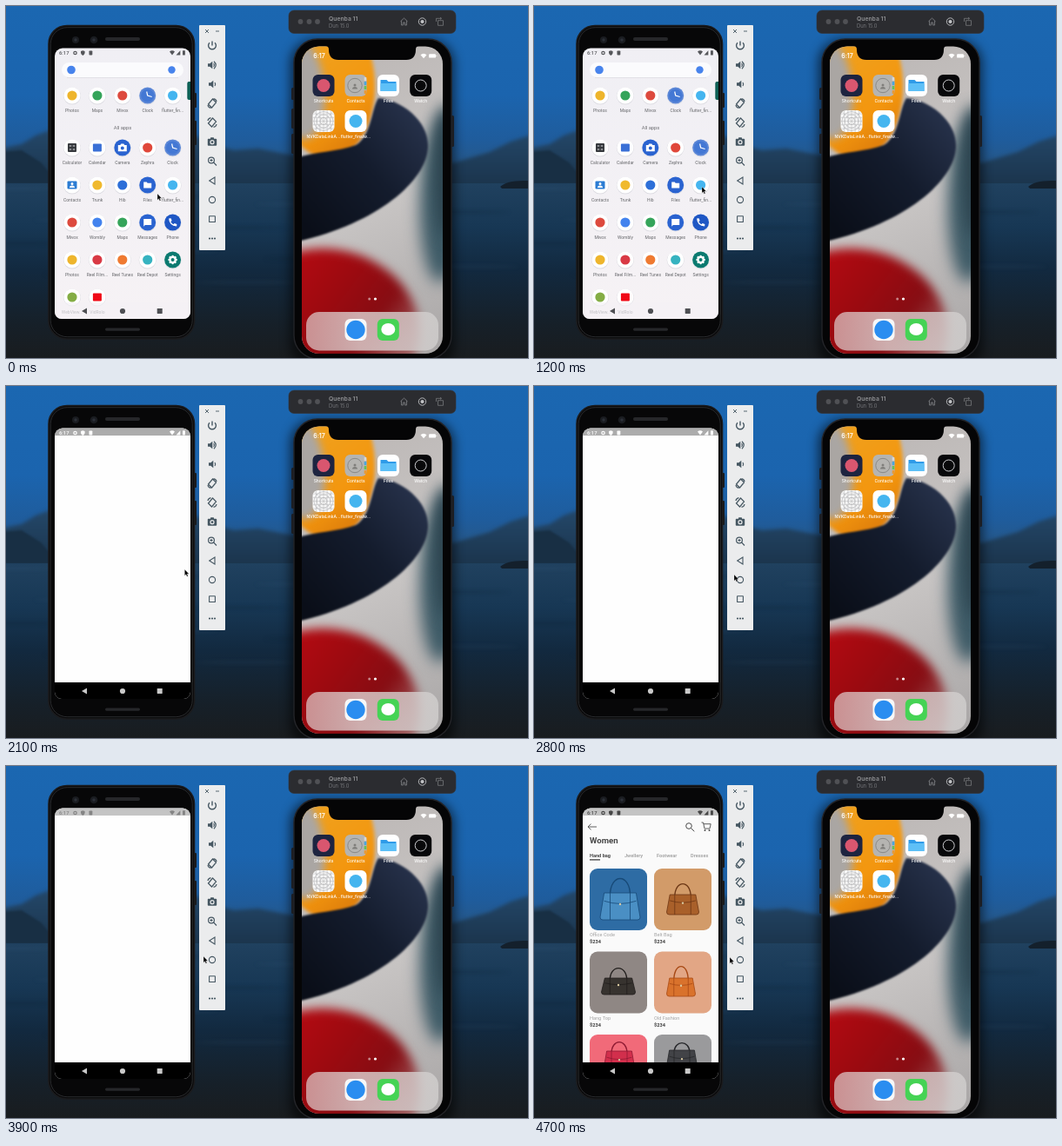
An HTML page with a canvas for the animation above (5 s loop, 600 px wide and 405 px high).

```html
<!DOCTYPE html>
<html lang="en">
<head>
<meta charset="utf-8">
<title>Two phone simulators</title>
<style>
html, body { margin: 0; width: 100%; height: 100%; overflow: hidden; background: #191c1f; }
canvas { display: block; }
</style>
</head>
<body>
<canvas id="stage" width="600" height="405"></canvas>
<script>
const c = document.getElementById('stage').getContext('2d');
const LOOP = 5000, STEP = 100;
const INK = '#465762', BLUE = '#2a63d0';

// ---- drawing helpers ----
function box(x, y, w, h, r, fill, stroke, lw = 1) {
  c.beginPath();
  c.roundRect(x, y, w, h, r);
  if (fill) { c.fillStyle = fill; c.fill(); }
  if (stroke) { c.strokeStyle = stroke; c.lineWidth = lw; c.stroke(); }
}
function disc(x, y, r, fill, stroke, lw = 1) {
  box(x - r, y - r, 2 * r, 2 * r, r, fill, stroke, lw);
}
function oval(x, y, rx, ry, turn, fill) {
  c.beginPath();
  c.ellipse(x, y, rx, ry, turn, 0, 7);
  c.fillStyle = fill;
  c.fill();
}
function shape(d, x, y, fill, stroke, lw = 1) {
  c.save();
  c.translate(x, y);
  const p = new Path2D(d);
  if (fill) { c.fillStyle = fill; c.fill(p); }
  if (stroke) { c.strokeStyle = stroke; c.lineWidth = lw; c.stroke(p); }
  c.restore();
}
function text(s, x, y, size, fill, weight = 400, align = 'left', family = 'Roboto') {
  c.font = `${weight} ${size}px ${family}, sans-serif`;
  c.textAlign = align;
  c.textBaseline = 'middle';
  c.fillStyle = fill;
  c.fillText(s, x, y);
}
function ramp(x0, y0, x1, y1, ...stops) {
  const g = c.createLinearGradient(x0, y0, x1, y1);
  stops.forEach(([at, color]) => g.addColorStop(at, color));
  return g;
}
function clipped(x, y, w, h, r, draw) {
  c.save();
  c.beginPath();
  c.roundRect(x, y, w, h, r);
  c.clip();
  draw();
  c.restore();
}
function blurred(px, draw) {
  c.save();
  c.filter = `blur(${px}px)`;
  draw();
  c.restore();
}
const clamp = v => Math.max(0, Math.min(1, v));
const grey = v => `rgb(${v},${v},${v})`;

// ---- desktop ----
function desktop() {
  c.fillStyle = ramp(0, 0, 0, 206, [0, '#1b67b1'], [.5, '#1b64ae'], [.75, '#1f5c9c'], [1, '#2b5378']);
  c.fillRect(0, 0, 600, 206);
  blurred(2, () => {
    shape('M-5 164L18 159 34 149 50 143 120 130 200 140 240 160 262 166 290 164 330 172 420 190 516 180 556 168 580 156 605 148V208H-5Z',
      0, 0, ramp(0, 140, 0, 208, [0, '#24486a'], [1, '#1b344c']));
  });
  blurred(1, () => shape('M-5 168L18 166 40 180 60 204H-5Z', 0, 0, '#182f44'));
  c.fillStyle = ramp(0, 204, 0, 405, [0, '#20415f'], [.25, '#173754'], [.5, '#12293f'], [.8, '#162029'], [1, '#191c1f']);
  c.fillRect(0, 204, 600, 201);
  blurred(2, () => {
    for (let i = 0; i < 14; i++)
      oval((i * 173) % 600, 210 + i * 9, 60, 1.5, 0, i % 2 ? '#0b1c2c40' : '#4d739822');
  });
  blurred(.6, () => shape('M568 208Q576 200 600 201V210H570Z', 0, 0, '#14202c'));
}

// ---- left phone ----
function leftBody() {
  box(215, 100, 4, 17, 1, '#1a1a1c');
  box(215, 132, 4, 28, 1, '#1a1a1c');
  box(49, 22.5, 167.5, 360.5, 21, '#070708', '#1b1b1d', 1.6);
  box(51.2, 24.7, 163, 356, 19, null, '#343538', .8);
  disc(80, 39, 4, '#1a1c20');
  disc(80, 39, 1.7, '#2c3038');
  disc(101, 39, 4.3, '#1a1c20');
  disc(101, 39, 1.8, '#2c3038');
  box(114, 36, 40, 4, 2, '#26272a');
  box(114, 370.5, 40, 3.2, 1.6, '#26272a');
}

function statusBar(color) {
  text('6:17', 61, 54, 5.8, color, 500);
  disc(79.5, 54, 1.7, null, color, 1.2);
  shape('M0-2.8L2.3-2V0Q2 2 0 3Q-2 2-2.3 0V-2Z', 88.3, 54, color);
  box(95.5, 51.5, 3.8, 5, .7, color);
  shape('M-3-1.5Q0-4 3-1.5L0 2.6Z', 191, 54, color);
  shape('M2.3-2.7V2.6H-2.5Z', 198, 54, color);
  box(203, 51.3, 2.9, 5.2, .5, color);
}

const navIcons = color => {
  shape('M3-3.6V3.6L-3 0Z', 90, 351, color);
  disc(134, 351, 3.1, color);
  box(173.7, 348, 6, 6, .4, color);
};

const FOLDER = 'M-4.5-3.5H-1L0-2.3H4.5V3.6H-4.5Z';
const PERSON = 'M-3 3Q-3 .5 0 .5Q3 .5 3 3ZM-1.5-1.5A1.5 1.5 0 1 1 1.5-1.5A1.5 1.5 0 1 1-1.5-1.5Z';

// A plain dot on the launcher's white backing
const dot = color => (x, y) => disc(x, y, 5.6, color);
const block = color => (x, y) => box(x - 5, y - 4.5, 10, 9, 1, color);
// A full disc with a white pictogram
const badge = (color, d) => (x, y) => {
  disc(x, y, 9.5, color);
  shape(d, x, y, '#fff');
};
const clock = (x, y) => {
  disc(x, y, 9.5, '#5b86d6');
  disc(x, y, 7.6, '#4478d4');
  shape('M-1-4.5L0 0L5 1.5', x, y, null, '#fff', 1.2);
};
const calculator = (x, y) => {
  box(x - 5, y - 5, 10, 10, 1, '#36393d');
  for (const [dx, dy] of [[-2, -2], [2, -2], [-2, 2], [2, 2]])
    box(x + dx - 1.2, y + dy - .5, 2.4, 1, 0, '#d8dadd');
};
const contact = (x, y) => {
  box(x - 5.5, y - 4.5, 11, 9, 1, '#2b7cd3');
  shape(PERSON, x, y, '#fff');
};
const camera = badge(BLUE, 'M-5-3H-2.5L-1.5-4.5H1.5L2.5-3H5V4.2H-5ZM-2 .5A2 2 0 1 0 2 .5A2 2 0 1 0-2 .5Z');
const files = badge(BLUE, FOLDER);
const bubble = badge(BLUE, 'M-4.5-4H4.5V3H-2.8L-4.5 4.7Z');
const receiver = badge('#1f57c4', 'M-4.5-4.5L-2-4.8-1-2-2.3-.8Q-1.2 1.4.8 2.3L2 1 4.8 2 4.5 4.4Q-4 4-4.5-4.5Z');
const gear = (x, y) => {
  disc(x, y, 9.5, '#0c7a70');
  for (let i = 0; i < 8; i++)
    oval(x + 4 * Math.cos(i * Math.PI / 4), y + 4 * Math.sin(i * Math.PI / 4), 1.3, 1.3, 0, '#fff');
  disc(x, y, 3.1, null, '#fff', 2.2);
};

const flutterApp = ['flutter_fin...', dot('#45b5ef')];
const photos = ['Photos', dot('#eeb52c')];
const maps = ['Maps', dot('#35a45a')];
const mail = ['Mivox', dot('#dd4a3e')];
const ROWS = [
  [103, photos, maps, mail, ['Clock', clock], flutterApp],
  [163, ['Calculator', calculator], ['Calendar', block('#3a70d6')], ['Camera', camera], ['Zephra', dot('#e0473a')], ['Clock', clock]],
  [206, ['Contacts', contact], ['Trunk', dot('#f0b92d')], ['Hib', dot('#2d6fd8')], ['Files', files], flutterApp],
  [249, mail, ['Wombly', dot('#4383ee')], maps, ['Messages', bubble], ['Phone', receiver]],
  [292, photos, ['Reel Film...', dot('#d93a45')], ['Reel Tunes', dot('#ef7a31')], ['Reel Depot', dot('#36b3c0')], ['Settings', gear]],
  [335, ['WebView...', dot('#84ad45')], ['VidRolo', block('#f00a17')]],
];

function launcher() {
  c.fillStyle = ramp(0, 48, 0, 360, [0, '#f0eff4'], [1, '#f6f2f5']);
  c.fillRect(56, 48, 156, 312);
  statusBar('#55565a');
  box(64, 65, 140, 17, 8.5, '#fbfbfd');
  c.fillStyle = '#d9d8de';
  c.fillRect(70, 82, 128, .6);
  disc(75, 73.5, 4.8, '#4783ec');
  disc(190.5, 73.5, 4.2, '#4783ec');
  text('All apps', 134, 140.5, 5.8, '#6b6c70', 400, 'center');
  for (const [y, ...apps] of ROWS)
    apps.forEach(([label, icon], i) => {
      const x = 76 + i * 28.9;
      disc(x, y + .6, 10, '#dddce2');
      disc(x, y, 9.6, '#fff');
      icon(x, y);
      text(label, x, y + 18, 5, '#66676b', 400, 'center');
    });
  c.fillStyle = '#f4f2f6a8';
  c.fillRect(56, 341, 156, 19);
  navIcons('#4e4f53');
  box(208.3, 87, 6, 21, 2, '#0d5f55');
}

// ---- shop page ----
function bag(x, y, w, h, rise, fill, edge) {
  const a = w / 2, b = a * .8, q = w / 4;
  shape(`M${-q} 3C${-q} ${-rise * 1.35} ${q} ${-rise * 1.35} ${q} 3`, x, y, null, edge, 1.4);
  shape(`M${-b} 0H${b}L${a} ${h - 3}Q${a} ${h} ${a - 3} ${h}H${3 - a}Q${-a} ${h} ${-a} ${h - 3}Z`, x, y, fill, edge, .8);
  shape(`M${-b} ${h * .3}Q0 ${h * .5} ${b} ${h * .3}M${-q} 0V${h}M${q} 0V${h}`, x, y, null, edge, .8);
  disc(x, y + h * .42, 1.2, '#d9c9a0');
}
const GOODS = [
  ['Office Code', '#2e6ca4', [99, 146, 46, 31, 17, '#4a8fc4', '#174a78']],
  ['Belt Bag', '#d29b69', [171, 148, 37, 23, 13, '#a9602a', '#6c3715']],
  ['Hang Top', '#8f8784', [97, 244, 39, 19, 12, '#37332f', '#211e1c']],
  ['Old Fashion', '#e2a685', [169, 244, 33, 21, 14, '#d9722c', '#a84915']],
  ['', '#f16a79', [98, 328, 36, 24, 11, '#d22f4c', '#8f1b33']],
  ['', '#9a9a9c', [170, 327, 36, 24, 9, '#424347', '#26272a']],
];
function shop(t) {
  c.save();
  c.globalAlpha = clamp((t - 4000) / 300);
  c.fillStyle = '#fafafa';
  c.fillRect(56, 57, 156, 284);
  shape('M5 0H-5M-1.5-3.3L-5 0L-1.5 3.3', 67, 70, null, '#4a4a4a', .9);
  disc(178, 69, 3.3, null, '#4a4a4a', 1);
  shape('M0 0L4 4', 180.3, 71.3, null, '#4a4a4a', 1);
  shape('M-5.5-4.5H-3.5L-2 2.5H4L5.2-2.8H-3', 198, 69.5, null, '#4a4a4a', .9);
  disc(196.5, 74, 1, '#4a4a4a');
  disc(201.5, 74, 1, '#4a4a4a');
  text('Women', 64, 86.5, 9.6, '#454545', 700);
  [['Hand bag', 64], ['Jwellery', 104], ['Footwear', 141], ['Dresses', 180]].forEach(([s, x], i) =>
    text(s, x, 103, 5.6, i ? '#a6a6a6' : '#454545', 700));
  c.fillStyle = '#333';
  c.fillRect(64, 107.3, 12, 1.2);
  clipped(56, 110, 156, 231, 0, () => GOODS.forEach(([name, color, parts], i) => {
    const x = 64 + i % 2 * 74, y = 118 + (i >> 1) * 95.5;
    const base = c.globalAlpha;
    c.globalAlpha = base * clamp((t - 4300) / 300);
    box(x, y, 66, 71, 9, color);
    bag(...parts);
    c.globalAlpha = base;
    if (name) {
      text(name, x, y + 76.5, 5.6, '#a3a3a3');
      text('$234', x, y + 84.5, 5.6, '#3c3c3c', 700);
    }
  }));
  c.restore();
}

function appWindow(t) {
  const top = t < 1600 ? 130 : t < 1700 ? 53 : 48;
  clipped(56, top, 156, 360 - top, 0, () => {
    c.fillStyle = '#fefefe';
    c.fillRect(56, 48, 156, 312);
    const barEnd = t < 1700 ? 60.5 : 57;
    const tone = t < 1700 ? 0 : t < 1800 ? 90 : 172 + 24 * clamp((t - 3700) / 200);
    c.fillStyle = grey(tone);
    c.fillRect(56, 48, 156, barEnd - 48);
    statusBar(grey(255 - 185 * clamp((t - 3700) / 300)));
    if (t > 4000) shop(t);
    c.fillStyle = '#000';
    c.fillRect(56, 341, 156, 19);
    navIcons('#c9c9c9');
  });
}

function toolbar() {
  box(222, 22, 30, 259, 1, '#ebeced');
  const x = 237, draw = (d, y, lw = 1.2) => shape(d, x, y, null, INK, lw);
  shape('M-2-2L2 2M2-2L-2 2', 231, 29, null, INK, .9);
  shape('M-2 0H2', 243, 29, null, INK, .9);
  draw('M0-5V0M-3-3.3A4.4 4.4 0 1 0 3-3.3', 45.5, 1.4);
  const speaker = 'M-5-1.7H-2.7L.3-4.3V4.3L-2.7 1.7H-5Z';
  shape(speaker, x, 68, INK);
  draw('M1.7-2Q3.2 0 1.7 2M2-4.2Q6.5 0 2 4.2', 68);
  shape(speaker, x + 1, 90, INK);
  draw('M3-2Q4.5 0 3 2', 90);
  draw('M-4.5 1L.5-5L4.5-1L-.5 5ZM-5 2Q-4.5 5-1.5 5.4M5-2Q4.5-5 1.5-5.4', 112);
  draw('M-4.5 1L.5-5L4.5-1L-.5 5ZM5 2Q4.5 5 1.5 5.4M-5-2Q-4.5-5-1.5-5.4', 134);
  box(x - 5.2, 152.7, 10.4, 8, 1, INK);
  box(x - 2, 151.3, 4, 3, .6, INK);
  disc(x, 156.7, 2, null, '#ebeced', 1.2);
  disc(x - 1, 177.5, 3.4, null, INK, 1.2);
  draw('M1.5 1L5 4.7M-2.6-1.3H.6M-1-2.9V.3', 178.8);
  draw('M3-4V4L-3.3 0Z', 201, 1.1);
  disc(x, 223, 3.6, null, INK, 1.1);
  box(x - 3.4, 241.7, 6.8, 6.8, .3, null, INK, 1.1);
  for (const dx of [-3, 0, 3]) disc(x + dx, 267.5, 1.1, INK);
}

// ---- right phone ----
function titleBar() {
  box(325, 5, 192, 26.5, 6, '#2b2c30', '#34353a', .6);
  for (const x of [338.5, 348.5, 358]) disc(x, 18, 2.9, '#505155');
  text('Quenba 11', 371, 15, 6.8, '#8f9093', 600, 'left', 'Inter');
  text('Dun 15.0', 371, 23, 5.8, '#737478', 400, 'left', 'Inter');
  shape('M-4-.3L0-4L4-.3M-3-.8V4H-1V1H1V4H3V-.8', 457.5, 18, null, '#85868a', .8);
  disc(478.5, 18, 4.2, null, '#c2c3c6', .9);
  disc(478.5, 18, 2.1, '#c2c3c6');
  shape('M-2.5-1.3H3.5V4.3H-2.5ZM-4.5 0V-3.7H1.5M0-5L1.5-3.7L0-2.4', 499, 18, null, '#77787c', .8);
}

function wallpaper() {
  c.fillStyle = ramp(340, 46, 502, 398, [0, '#bab5b3'], [.5, '#c9c6c5'], [1, '#a9a6a6']);
  c.fillRect(340, 46, 162, 355);
  blurred(9, () => {
    oval(503, 218, 27, 100, .04, '#3d5a66');
    oval(508, 190, 14, 75, 0, '#2b414c');
  });
  // Orange crescent around a grey core
  blurred(2, () => {
    oval(368, 88, 56, 88, -.06, ramp(340, 50, 425, 165, [0, '#f0a21f'], [.6, '#f3960e'], [1, '#d5730a']));
  });
  blurred(5, () => oval(335, 92, 31, 62, -.15, '#aaa6a3'));
  blurred(1.2, () => {
    shape('M330 176C350 168 380 168 402 160C420 150 420 118 428 106C455 108 487 133 485 163C483 202 425 252 330 272Z',
      0, 0, ramp(340, 250, 480, 130, [0, '#0a0e18'], [.55, '#141c2d'], [1, '#27324b']));
  });
  blurred(6, () => {
    oval(372, 366, 104, 86, .22, ramp(345, 285, 470, 380, [0, '#b00a11'], [.35, '#9c0a10'], [.7, '#860d13'], [1, '#9d5a5c']));
  });
}

function tile(x, y, fill, label) {
  box(x - 12.5, y - 12.5, 25, 25, 6, fill);
  if (label) text(label, x, y + 17.6, 4.9, '#fff', 500, 'center', 'Inter');
}
function rightApps() {
  tile(365, 91.5, '#1d2440', 'Shortcuts');
  disc(365, 91.5, 7.5, '#d9566f');
  tile(402, 91.5, '#b5b4b1', 'Contacts');
  disc(401, 91.5, 8.2, null, '#7f7e7b', .8);
  shape(PERSON, 401, 92.5, '#7f7e7b');
  ['#d8d8d6', '#4ba6dc', '#67c15a', '#e89a35'].forEach((color, i) => box(411.7, 82 + i * 5, 2.6, 4, .5, color));
  tile(439.5, 91.5, '#fff', 'Files');
  shape('M-9-6.5H-2L0-4.5H9V6.5H-9Z', 439.5, 91.5, '#2f9be8');
  box(430.5, 89, 18, 9, 1, '#5ec0f7');
  tile(476.7, 91.5, '#08080a', 'Watch');
  disc(476.7, 91.5, 6.5, null, '#c9c9cc', 1);

  tile(365, 132.5, '#fafafa', 'NVKDataLinkA...');
  clipped(352.5, 120, 25, 25, 6, () => {
    for (let i = 1; i < 6; i++) {
      const d = i * 25 / 6;
      shape(`M${d} 0V25M0 ${d}H25`, 352.5, 120, null, '#b4b4b6', .5);
    }
    shape('M0 0L25 25M25 0L0 25', 352.5, 120, null, '#b4b4b6', .5);
    for (const r of [4, 7.5, 11]) disc(365, 132.5, r, null, '#a9a9ac', .6);
  });
  tile(402, 132.5, '#fff', 'flutter_finalw...');
  disc(402, 132.5, 7.5, '#45b5ef');

  disc(417.7, 337, 1.5, '#ffffff80');
  disc(424.5, 337, 1.6, '#fff');
  box(345, 352, 152, 44.5, 15, ramp(345, 0, 497, 0, [0, '#dcc4c4b8'], [.4, '#ddd0cfd0'], [1, '#d2d0cfc8']));
  tile(402, 372.5, '#f6f7f8');
  disc(402, 372.5, 10.7, '#2a8df0');
  tile(439.3, 372.5, '#45d354');
  oval(439.3, 372, 8, 7, 0, '#fff');
}

function rightPhone() {
  blurred(6, () => box(326, 38, 190, 380, 28, '#00000088'));
  for (const [x, y, h] of [[328, 94, 14], [328, 118, 23], [328, 147, 23], [511, 126, 36]])
    box(x, y, 4, h, 1.5, '#1c1e23');
  box(331, 38, 181, 368, 27, '#050506', '#232428', 1.4);
  clipped(340, 46.5, 162, 353.5, 20, () => {
    wallpaper();
    rightApps();
  });
  shape('M367 46Q371 46 371 50Q371 62 382 62H460Q471 62 471 50Q471 46 475 46Z', 0, 0, '#050506');
  text('6:17', 360, 57.5, 7, '#fff', 600, 'center', 'Inter');
  shape('M-3.5-1.2Q0-4.2 3.5-1.2L0 2.8Z', 480, 57.5, '#fff');
  box(486, 55.2, 8, 4.4, 1.2, '#fff');
  box(494.5, 56.6, .8, 1.6, .4, '#fff');
}

// ---- pointer: time, x, y ----
const PATH = [
  [0, 174, 216], [400, 191, 211], [500, 191, 211], [700, 193, 208], [1900, 193, 208],
  [2500, 230, 217], [2800, 230, 217], [3100, 227, 219], [3900, 227, 219], [4300, 225, 220], [LOOP, 225, 220],
];
function pointer(t) {
  const i = PATH.findIndex(k => k[0] > t);
  const [t0, x0, y0] = PATH[i - 1], [t1, x1, y1] = PATH[i];
  const k = (t - t0) / (t1 - t0);
  shape('M0 0V7.2L1.6 5.7L2.7 8.2L3.9 7.7L2.8 5.2H5Z', x0 + (x1 - x0) * k, y0 + (y1 - y0) * k, '#000', '#ffffffb0', .4);
}

function draw(t) {
  desktop();
  leftBody();
  clipped(56, 48.5, 156, 311.5, [9, 9, 8, 8], () => {
    if (t < 1700) launcher();
    if (t >= 1500) appWindow(t);
  });
  toolbar();
  rightPhone();
  titleBar();
  pointer(t);
}

let shown = -1;
function tick() {
  const t = Math.floor(performance.now() % LOOP / STEP) * STEP;
  if (t !== shown) draw(shown = t);
  requestAnimationFrame(tick);
}
tick();
</script>
</body>
</html>
```
